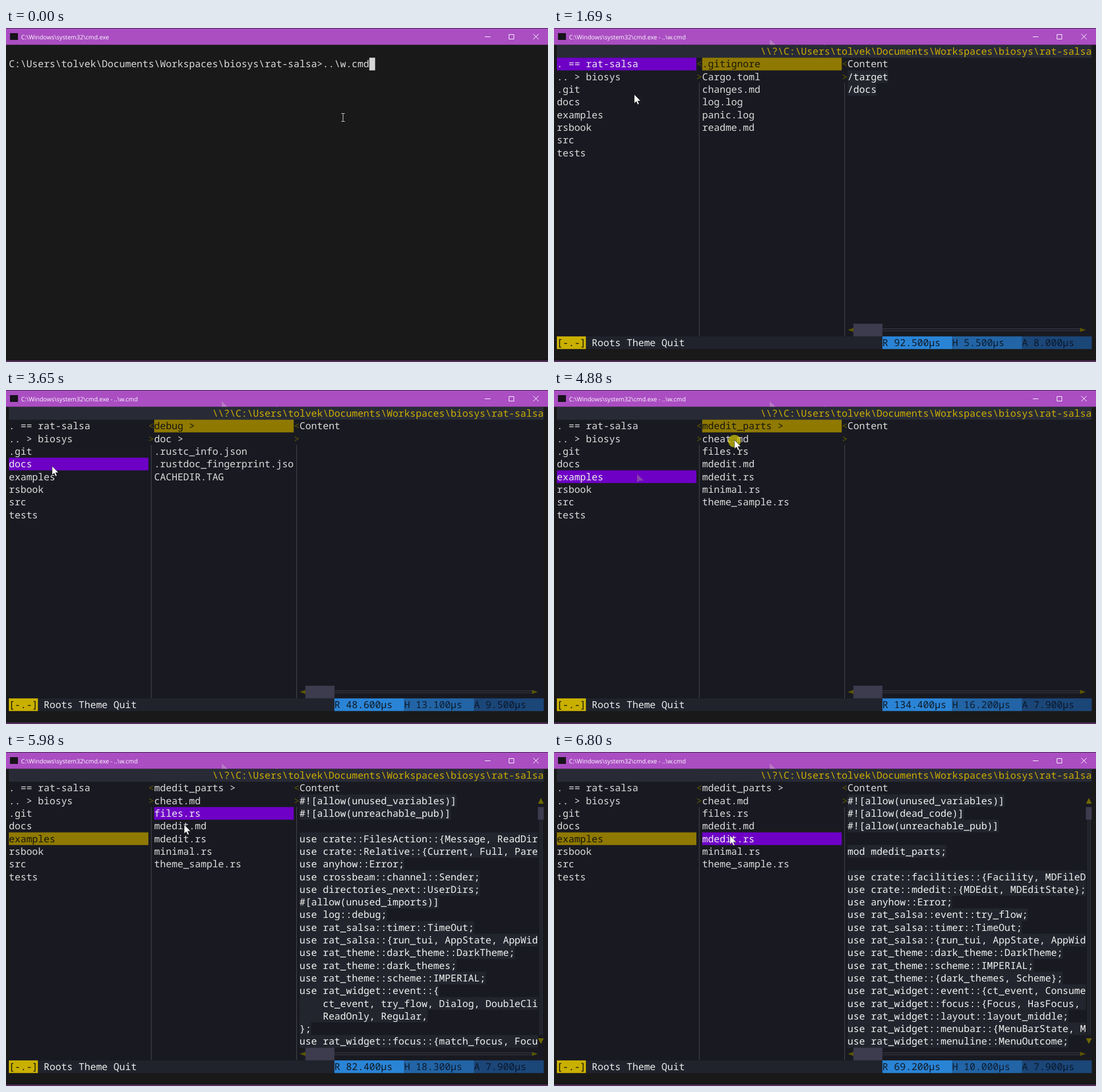
An HTML page for the animation above (8 s loop, 952 px wide and 588 px high).

```html
<!DOCTYPE html>
<html lang="en">
<head>
<meta charset="utf-8">
<title>File browser</title>
<style>
html, body { margin: 0; width: 100%; height: 100%; overflow: hidden; background: #191919; }
svg { display: block; width: 952px; height: 588px; }
text { white-space: pre; text-rendering: geometricPrecision; }
#screen text { font: 17.02px "Noto Sans Mono", monospace; }
#title { font: 10.6px "Open Sans", sans-serif; fill: #fff; }
</style>
</head>
<body>
<svg viewBox="0 0 952 588">
  <rect width="952" height="588" fill="#191919"/>
  <rect width="952" height="29.5" fill="#aa4ec2"/>
  <rect width="952" height="1" fill="#3b2343"/>
  <rect y="586" width="952" height="1" fill="#9a48b0"/>
  <rect x="7" y="9" width="14" height="12" fill="#17131a"/>
  <text id="title" x="26.5" y="19.5"></text>
  <path d="M841 15.5h10M883.5 11.5h8.5v8h-8.500zM926 10.500l9.500 9.500M935.500 10.500l-9.500 9.500" fill="none" stroke="#fff"/>
  <g id="screen"></g>
  <g id="trail" fill="#c3a0cb" fill-opacity=".55">
    <path id="trailTop" d="M379 20v9.500h10z"/>
    <path id="trailMid" d="M475 28v1.500h2.500z"/>
    <path id="trailRow" d="M146 148v14.500l4-3h7.500z" fill="#a07a95"/>
  </g>
  <circle id="click" r="11" fill="#ddd000" fill-opacity=".68"/>
  <path id="beam" d="M589 150.500h2.500l.500 .500l.500-.500h2.500M592 151v13M589 164.500h2.500l.500-.500l.500 .500h2.500" fill="none" stroke="#ddd"/>
  <path id="arrow" d="M0 0v15.600l3.600-3.300l2.400 5.400l2.500-1l-2.400-5.300h5z" fill="#fff" stroke="#111" stroke-width=".6"/>
</svg>
<script>
const LOOP = 8000, LEFT = 5, TOP = 30, CW = 10.212, RH = 22.3;
const $ = id => document.getElementById(id);
const colX = c => LEFT + c * CW;
const rowY = r => TOP + r * RH;
const path = String.raw`C:\Users\tolvek\Documents\Workspaces\biosys\rat-salsa`;
const shell = String.raw`C:\Windows\system32\cmd.exe`;

const esc = s => s.replace(/&/g, '&amp;').replace(/</g, '&lt;');
const text = (c, r, s, fill = '#dcdcdc') =>
  `<text x="${colX(c)}" y="${rowY(r) + 17.1}" fill="${fill}">${esc(s)}</text>`;
const block = (c, r, w, h, fill) =>
  `<rect x="${colX(c)}" y="${rowY(r)}" width="${w * CW}" height="${h * RH}" fill="${fill}"/>`;
const shape = (d, fill, stroke = 'none') => `<path d="${d}" fill="${fill}" stroke="${stroke}"/>`;

const dirs = ['. == rat-salsa', '.. > biosys', '.git', 'docs', 'examples', 'rsbook', 'src', 'tests'];
const rootFiles = ['.gitignore', 'Cargo.toml', 'changes.md', 'log.log', 'panic.log', 'readme.md'];
const docFiles = ['debug >', 'doc >', '.rustc_info.json', '.rustdoc_fingerprint.json', 'CACHEDIR.TAG'];
const exampleFiles = ['mdedit_parts >', 'cheat.md', 'files.rs', 'mdedit.md', 'mdedit.rs', 'minimal.rs', 'theme_sample.rs'];

const ignoreText = ['/target', '/docs'];
const cheatText = `# Markdown Cheat Sheet

## Headings

# H1
## H2
### H3

## Emphasis

**bold text**
*italicized text*

## Lists

1. First item
2. Second item
3. Third item

- First item
- Second item`.split('\n');
const filesText = `#![allow(unused_variables)]
#![allow(unreachable_pub)]

use crate::FilesAction::{Message, ReadDir
use crate::Relative::{Current, Full, Pare
use anyhow::Error;
use crossbeam::channel::Sender;
use directories_next::UserDirs;
#[allow(unused_imports)]
use log::debug;
use rat_salsa::timer::TimeOut;
use rat_salsa::{run_tui, AppState, AppWid
use rat_theme::dark_theme::DarkTheme;
use rat_theme::dark_themes;
use rat_theme::scheme::IMPERIAL;
use rat_widget::event::{
    ct_event, try_flow, Dialog, DoubleCli
    ReadOnly, Regular,
};
use rat_widget::focus::{match_focus, Focu`.split('\n');
const mdeditText = `#![allow(unused_variables)]
#![allow(dead_code)]
#![allow(unreachable_pub)]

mod mdedit_parts;

use crate::facilities::{Facility, MDFileD
use crate::mdedit::{MDEdit, MDEditState};
use anyhow::Error;
use rat_salsa::event::try_flow;
use rat_salsa::timer::TimeOut;
use rat_salsa::{run_tui, AppState, AppWid
use rat_theme::dark_theme::DarkTheme;
use rat_theme::scheme::IMPERIAL;
use rat_theme::{dark_themes, Scheme};
use rat_widget::event::{ct_event, Consume
use rat_widget::focus::{Focus, HasFocus, 
use rat_widget::layout::layout_middle;
use rat_widget::menubar::{MenuBarState, M
use rat_widget::menuline::MenuOutcome;`.split('\n');

// start, focused column, selected dir, selected file, files, content, timings
const views = [
  [140, 0, 0, 0, rootFiles, ignoreText, '65.300 14.200 8.000'],
  [1540, 0, 0, 0, rootFiles, ignoreText, '92.500 5.500 8.000'],
  [2780, 0, 3, 0, docFiles, [], '48.600 13.100 9.500'],
  [3860, 0, 4, 0, exampleFiles, [], '134.400 16.200 7.900'],
  [4950, 1, 4, 1, exampleFiles, cheatText, '96.100 17.500 7.900'],
  [5510, 1, 4, 2, exampleFiles, filesText, '82.400 18.300 7.900'],
  [6420, 1, 4, 4, exampleFiles, mdeditText, '69.200 10.000 7.900']
];

const clicks = [2710, 3790, 4880, 5440, 6350];

// pointer tip: time, x, y
const moves = [
  [0, 590, 157], [1000, 590, 157], [1210, 476, 28], [1350, 380, 21], [1690, 141, 117],
  [1820, 140, 117], [2240, 110, 141], [2640, 85, 133], [3580, 85, 133], [3650, 81, 134],
  [3790, 80, 149], [3990, 87, 150], [4320, 92, 150], [4390, 147, 148], [4600, 250, 113],
  [4810, 317, 88], [5090, 317, 88], [5440, 314, 110], [5780, 313, 113], [5930, 313, 118],
  [5980, 313, 128], [6300, 309, 147], [6600, 308, 146], [6800, 309, 147], [LOOP, 309, 147]
];

function pointer(t) {
  const i = moves.findIndex(m => m[0] > t);
  const [t0, x0, y0] = moves[i - 1], [t1, x1, y1] = moves[i];
  const k = Math.floor((t - t0) / 70) * 70 / (t1 - t0);
  return [Math.round(x0 + (x1 - x0) * k), Math.round(y0 + (y1 - y0) * k)];
}

function list(col, items, sel, focused) {
  return block(col, sel + 1, 24, 1, focused ? '#6e00c6' : '#8f7900') +
    items.map((s, i) => text(col, i + 1, s.slice(0, 24),
      i !== sel ? '#dcdcdc' : focused ? '#eee' : '#17160d')).join('');
}

function divider(col) {
  const x = colX(col + 0.5);
  return text(col, 1, '<', '#5f5900') + text(col, 2, '>', '#5f5900') +
    shape(`M${x} ${rowY(3)}V${rowY(23)}`, 'none', '#464752');
}

function scrollbars(vertical) {
  const olive = '#5c5700', line = '#3b3c49', thumb = '#3d3b4e';
  let s = shape('M516 531.500l10-3.500v7zM934 531.500l-10-3.500v7z', olive) +
    shape('M577 529.500H924M577 533H924', 'none', line) + block(51, 22, 5, 1, thumb);
  if (vertical) {
    s += shape('M934.500 91l5-10l5 10zM934.500 504l5 10l5-10z', '#706900') +
      shape('M938 119.500V498M941.500 119.500V498', 'none', line) + block(91, 3, 1, 1, thumb);
  }
  return s;
}

function browser([, focus, dir, file, files, lines, times]) {
  const [r, h, a] = times.split(' ');
  const meter = (col, label, value, bg, fg) =>
    block(col, 23, 12, 1, bg) + text(col, 23, `${label} ${value}µs`, fg);
  return block(0, 0, 92, 24, '#191a21') + block(0, 0, 92, 1, '#282b36') +
    text(35, 0, '\\\\?\\' + path, '#cdae00') +
    list(0, dirs, dir, focus === 0) + list(25, files, file, focus === 1) +
    divider(24) + divider(49) + text(50, 1, 'Content') +
    lines.map((s, i) => s && block(50, i + 2, s.length, 1, '#22252d') + text(50, i + 2, s, '#f2f2f2')).join('') +
    scrollbars(lines.length > 2) +
    block(0, 23, 92, 1, '#20232c') + block(0, 23, 5, 1, '#c9b000') +
    text(0, 23, '[-.-]', '#17160d') + text(6, 23, 'Roots Theme Quit', '#ececec') +
    meter(56, 'R', r, '#2a84d6', '#101820') +
    meter(68, 'H', h, '#2264a5', '#0d1b2e') +
    meter(80, 'A', a, '#1b4678', '#0b182b');
}

const prompt = () => text(0, 1, path + '>..\\w.cmd');
const caret = (c, r) => block(c, r, 1, 1, '#d6d6d6');

let shown = '';
function draw(t) {
  const view = views.filter(v => v[0] <= t).pop();
  const key = view ? 'v' + view[0] : t < 70 ? 'typed' : 'run';
  if (key !== shown) {
    shown = key;
    $('title').textContent = key === 'typed' ? shell : shell + ' - ..\\w.cmd';
    $('screen').innerHTML = view ? browser(view)
      : prompt() + (key === 'typed' ? caret(62, 1) : caret(0, 2));
  }
  const [x, y] = pointer(t);
  const show = (id, on) => $(id).setAttribute('visibility', on ? 'visible' : 'hidden');
  $('arrow').setAttribute('transform', `translate(${x} ${y})`);
  $('click').setAttribute('cx', x);
  $('click').setAttribute('cy', y + 2);
  show('arrow', view);
  show('beam', !view);
  show('click', clicks.some(c => t >= c && t < c + 70));
  show('trailMid', t >= 1280);
  show('trailTop', t >= 1420);
  show('trailRow', t >= 4460 && t < 4950);
}

function tick(now) {
  draw(now % LOOP);
  requestAnimationFrame(tick);
}
draw(0);
requestAnimationFrame(tick);
</script>
</body>
</html>
```
